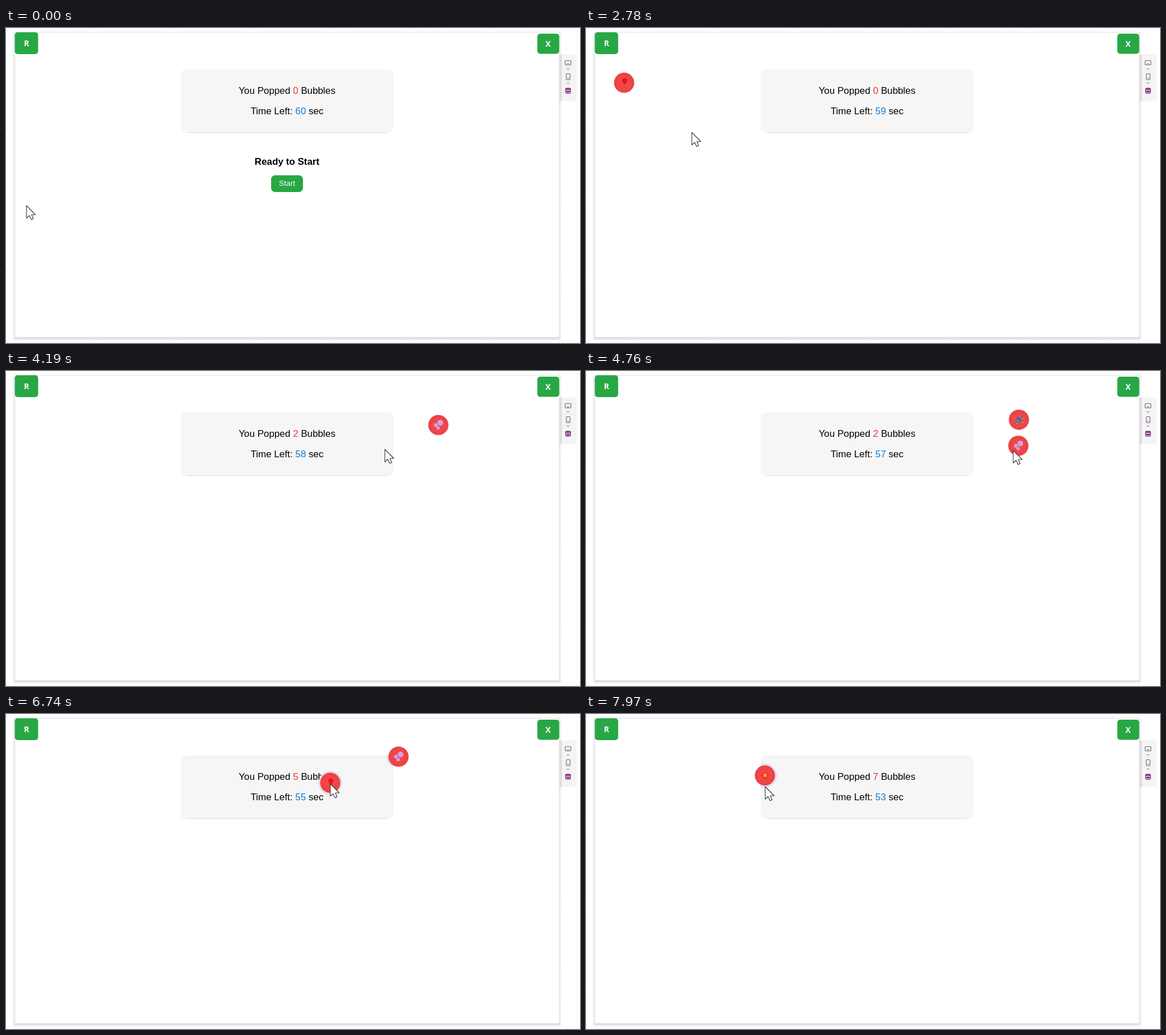
An HTML page that plays this animation: 1009x555 px, repeating every 8 s.

```html
<!DOCTYPE html>
<html lang="en">
<head>
<meta charset="utf-8">
<title>Bubble game</title>
<style>
  html, body { margin: 0; width: 100%; height: 100%; overflow: hidden; background: #fff; }
  svg { display: block; width: 1009px; height: 555px; }
  text { font-family: "Liberation Sans", Arial, sans-serif; font-size: 16.8px; text-anchor: middle; }
  .key { font: bold 14px "Open Sans", sans-serif; fill: #fff; }
  .icon { fill: none; stroke: #666; stroke-width: 1.1; }
</style>
</head>
<body>
<svg viewBox="0 0 1009 555">
  <defs>
    <pattern id="dots" x="-5.8" y="-2.3" width="15.65" height="15.65" patternUnits="userSpaceOnUse">
      <circle cx="7.8" cy="7.8" r=".8" fill="#d6d6da"/>
    </pattern>
    <radialGradient id="red">
      <stop offset="0" stop-color="#fb4a4c"/>
      <stop offset=".7" stop-color="#f34346"/>
      <stop offset="1" stop-color="#e8403f"/>
    </radialGradient>
    <clipPath id="panelClip"><rect x="307" y="73" width="374" height="112" rx="9"/></clipPath>

    <g id="popper">
      <path d="M-8 8L-3-4Q4-1 4 4Z" fill="#2f6a9e"/>
      <path d="M-6 4l3 3M-4 0l5 5" stroke="#e9b24c" stroke-width="1.3"/>
      <path d="M-1-3Q0-6-2-8M2-1Q3-5 7-7M4 2Q6 0 8 2" fill="none" stroke="#3d72b8" stroke-width="1.6"/>
      <g fill="#dca65a"><circle cx="2" cy="-6" r="1"/><circle cx="7" cy="-2" r="1"/><circle cx="6" cy="5" r="1"/></g>
    </g>
    <g id="foam" fill="#cda5e8">
      <circle cx="3.5" cy="-4" r="5"/><circle cx="-4.5" r="3.2"/><circle cx="-.5" cy="5" r="3"/>
    </g>
    <g id="balloon">
      <path d="M1 3Q-2 6 1 9" fill="none" stroke="#8a4a8a"/>
      <path d="M1-8C7-8 7-1 1 3C-5-1-5-8 1-8Z" fill="#e3171c"/>
    </g>
    <g id="burst">
      <path d="M0-8L2-3 6-6 4-1 8 1 4 2 5 7 0 4-4 7-4 2-8 0-4-2-5-6-2-3Z" fill="#e8282a"/>
      <path d="M0-5L1.5-2 4-2 2.5 1 3 4 0 2-3 3-2 0-4-2-1.5-2Z" fill="#ffb42e"/>
    </g>
  </defs>

  <rect width="1009" height="555" fill="url(#dots)"/>
  <rect x="12" y="7" width="964" height="543" rx="3" fill="#f2eff4"/>
  <rect x="15" y="541" width="959" height="7" rx="2" fill="#e3dae7"/>
  <rect x="15.5" y="7.5" width="957" height="537.5" fill="#fff" stroke="#e4dfe6"/>

  <rect x="973" y="46.5" width="30" height="82" rx="3" fill="#f5f4f5"/>
  <path d="M973 47h4v82h-4z" fill="#e3dae6"/>
  <g class="icon">
    <rect x="983" y="57.5" width="10" height="7.5" rx="1"/><path d="M986 63h4"/>
    <path d="M985.5 71l2.5 2 2.5-2M985.5 96l2.5 2 2.5-2" stroke-width=".9"/>
    <rect x="985" y="80.5" width="6.5" height="10.5" rx="1"/><path d="M987 88.5h2.5"/>
  </g>
  <rect x="983.5" y="106" width="9" height="9" rx="1.5" fill="#c9a5cc" stroke="#742774"/>
  <path d="M984 107.5h8M985 112h6" stroke="#742774" stroke-width="1.8"/>

  <g fill="#28a745">
    <rect x="15.5" y="7.5" width="41" height="38.5" rx="5"/>
    <rect x="934" y="10" width="38.5" height="35.5" rx="5"/>
  </g>
  <text class="key" x="36" y="32">R</text>
  <text class="key" x="953" y="33">X</text>

  <rect x="307" y="73" width="374" height="112" rx="9" fill="#f6f6f6"/>
  <path d="M318 184.5h352" stroke="#dedede"/>
  <text x="494" y="115.6">You Popped <tspan id="count" fill="#f0323c">0</tspan> Bubbles</text>
  <text x="494" y="152">Time Left: <tspan id="clock" fill="#0f7bd8">60</tspan> sec</text>

  <g id="intro">
    <text x="494" y="240.8" font-weight="bold">Ready to Start</text>
    <rect x="466" y="259.5" width="56" height="29.5" rx="7" fill="#28a745"/>
    <text x="494" y="278" fill="#fff" style="font-size:13.5px">Start</text>
  </g>

  <g id="halos" clip-path="url(#panelClip)"></g>
  <g id="bubbles"></g>
  <path id="cursor" d="M0 0V22L5 17.5 8.5 24.8 12 23.2 9 16H15.8Z" fill="#fff" stroke="#333" stroke-width="1.1" stroke-linejoin="round"/>
</svg>
<script>
  const LOOP = 8000, STEP = 30;
  const CLICK = 1460, START = 1550, TICK = 894, SPAWN = 715;
  const TOP = 63.3, SPEED = 46 / SPAWN;
  const STALL = 1980;   // the game hangs here until its first bubble is due

  const $ = id => document.getElementById(id);

  // Bubbles spawn at a steady rate; each has its x and the click that pops it.
  const bubbles = [
    { art: 'balloon', x: 67, hit: [3050, 64, 122] },
    { art: 'popper', x: 661, hit: [4100, 657, 138] },
    { art: 'foam', x: 760, hit: [4790, 751, 140] },
    { art: 'popper', x: 761, hit: [5480, 756, 134] },
    { art: 'popper', x: 511, hit: [6290, 513, 140] },
    { art: 'balloon', x: 570, hit: [6770, 570, 123] },
    { art: 'foam', x: 690, hit: [7250, 684, 114] },
    { art: 'burst', x: 314.5, hit: [8010, 315, 128] }
  ].map((b, i) => ({ ...b, ...build(b.art), born: START + SPAWN * (i + 1), pop: b.hit[0] }));

  // The pointer rests briefly at each click and otherwise glides between points.
  const route = [
    [0, 36, 313], [390, 38, 312], [740, 400, 330], [880, 538, 302],
    [1030, 502, 281], [1430, 502, 281], [START, 502, 344], [2210, 502, 344],
    [3620, 509, 160], [5750, 585, 168],
    ...bubbles.flatMap(({ hit: [t, x, y] }) => [[t - 50, x, y], [t + 30, x, y]])
  ].sort((a, b) => a[0] - b[0]);

  function add(parent, tag, attrs) {
    const el = document.createElementNS('http://www.w3.org/2000/svg', tag);
    for (const name in attrs) el.setAttribute(name, attrs[name]);
    return parent.appendChild(el);
  }

  function build(art) {
    const halo = add($('halos'), 'circle', { r: 20.8, fill: '#dfdde7' });
    const body = add($('bubbles'), 'g', {});
    add(body, 'circle', { r: 18.5, fill: '#e0c4cc', opacity: .5 });
    add(body, 'circle', { r: 17.6, fill: 'url(#red)' });
    add(body, 'use', { href: '#' + art });
    return { halo, body };
  }

  const place = (el, x, y) => el.setAttribute('transform', `translate(${x} ${y})`);
  const show = (el, on) => { el.style.display = on ? '' : 'none'; };

  function pointer(t) {
    const i = route.findIndex(p => p[0] > t);
    const [t0, x0, y0] = route[i - 1], [t1, x1, y1] = route[i];
    const k = (t - t0) / (t1 - t0);
    return [x0 + (x1 - x0) * k, y0 + (y1 - y0) * k].map(Math.round);
  }

  function draw(now) {
    const t = Math.max(0, Math.floor((now % LOOP - 20) / STEP) * STEP + 20);
    const game = t < STALL ? t : Math.max(t, START + SPAWN);
    for (const b of bubbles) {
      for (const el of [b.halo, b.body]) {
        show(el, game >= b.born && game < b.pop);
        place(el, b.x, TOP + (game - b.born) * SPEED);
      }
    }
    $('count').textContent = bubbles.filter(b => t >= b.pop).length;
    $('clock').textContent = 60 - Math.max(0, Math.floor((t - START) / TICK));
    show($('intro'), t < CLICK);
    place($('cursor'), ...pointer(t));
    requestAnimationFrame(draw);
  }
  requestAnimationFrame(draw);
</script>
</body>
</html>
```
